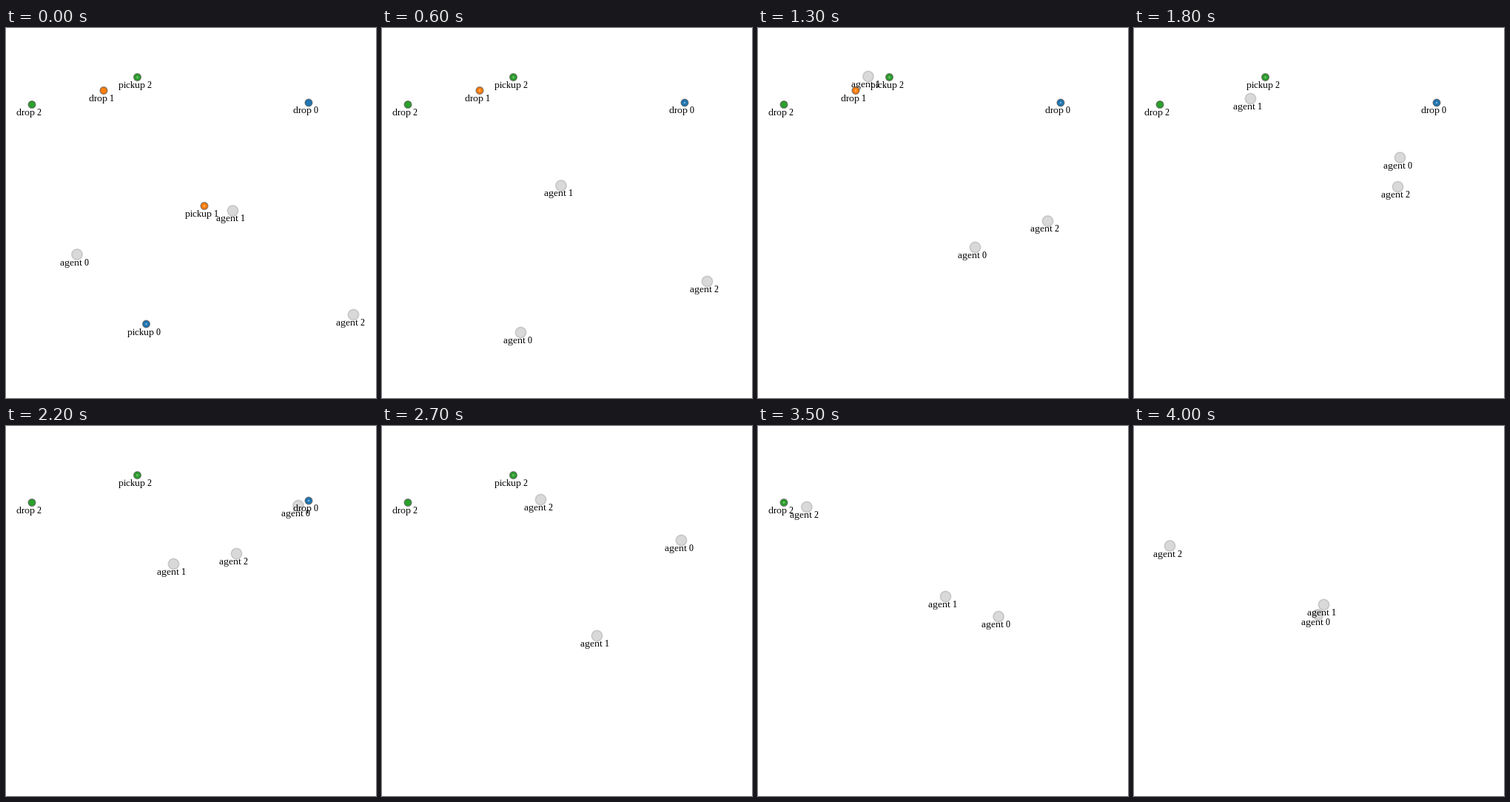
A matplotlib script for the animation above (4100 ms loop, 500x500 px).

```python
import numpy as np
import matplotlib.pyplot as plt
from matplotlib.animation import FuncAnimation
from matplotlib.patches import Circle

plt.rcParams.update({
    "font.family": "Liberation Serif",
    "text.hinting": "native",
    "text.hinting_factor": 1,
})

FRAMES, INTERVAL, DPI = 41, 100, 100
PX = 72 / DPI
BLUE, ORANGE, GREEN = "#1f77b4", "#ff7f0e", "#2ca02c"

# Way points (step, x, y) of each agent
PATHS = [
    [(0, 95.5, 305.5), (3, 138, 362), (6, 187, 411), (9, 233, 378),
     (13, 293, 296), (22, 394.5, 107), (24, 403, 98), (27, 404, 154),
     (31, 382, 236), (33, 356, 255), (36, 308.5, 256), (40, 248, 254.5)],
    [(0, 306, 246.5), (4, 271, 235), (6, 241.5, 212.5), (12, 154, 85),
     (13, 148.5, 65), (15, 128, 55), (16, 129, 62), (18, 157, 95),
     (22, 226, 186), (27, 290, 283), (28, 293.5, 285), (31, 279.5, 256),
     (35, 253, 230), (40, 256, 241)],
    [(0, 469, 387), (6, 439, 342), (13, 391, 260.5), (22, 311, 172),
     (27, 214, 99), (29, 181, 81), (31, 158.5, 86.5), (36, 46.5, 114),
     (37, 33, 118), (38, 30.5, 128), (40, 48, 161.5)],
]

# colour, pickup spot, drop spot, step of pickup, step of drop
TASKS = [
    (BLUE, (189, 399.5), (408.5, 100.5), 6, 23),
    (ORANGE, (267.5, 240), (131.5, 84), 4, 17),
    (GREEN, (177, 66), (34.5, 103), 29, 37),
]


def trace(path):
    """Cubic Hermite curve through the way points, starting at rest."""
    t, *xy = np.array(path, float).T
    steps = np.arange(FRAMES)
    i = np.clip(np.searchsorted(t, steps, "right") - 1, 0, len(t) - 2)
    h = t[i + 1] - t[i]
    u = (steps - t[i]) / h
    curve = []
    for p in xy:
        m = np.gradient(p, t)
        m[0] = 0
        curve.append((1 + 2 * u) * (1 - u) ** 2 * p[i]
                     + u * (1 - u) ** 2 * h * m[i]
                     + u * u * (3 - 2 * u) * p[i + 1]
                     + u * u * (u - 1) * h * m[i + 1])
    return np.column_stack(curve)


fig = plt.figure(figsize=(5, 5), dpi=DPI, facecolor="white")
ax = fig.add_axes([0, 0, 1, 1])
ax.set(xlim=(-0.5, 499.5), ylim=(499.5, -0.5))
ax.axis("off")


class Marker:
    def __init__(self, name, pos, radius, fill, edge, z):
        self.disc = ax.add_patch(Circle(pos, radius, fc=fill, ec=edge,
                                        lw=1.6 * PX, zorder=z))
        self.label = ax.text(0, 0, name, size=13 * PX, color="black",
                             ha="center", va="baseline", zorder=z + 0.5)
        self.parts = [self.disc, self.label]
        self.move(pos)

    def move(self, pos):
        self.disc.set_center(pos)
        self.label.set_position((pos[0] - 3.5, pos[1] + 14.5))

    def add_dot(self, pos, z):
        self.dot = ax.add_patch(Circle(pos, 1.1, fc=(1, 1, 1, 0.5), lw=0,
                                       zorder=z + 0.2))
        self.parts.append(self.dot)

    def show(self, on):
        for part in self.parts:
            part.set_visible(on)


def task_marker(name, pos, color, z):
    marker = Marker(name, pos, 4.8, color, (0.25, 0.25, 0.25, 0.5), z)
    marker.add_dot(pos, z)
    return marker


tracks = [trace(p) for p in PATHS]
agents = [Marker(f"agent {k}", track[0], 7.2, (0, 0, 0, 0.15),
                 (0, 0, 0, 0.14), 1 + k) for k, track in enumerate(tracks)]
pickups = [task_marker(f"pickup {k}", task[1], task[0], 5 + k)
           for k, task in enumerate(TASKS)]
drops = [task_marker(f"drop {k}", task[2], task[0], 9 + k)
         for k, task in enumerate(TASKS)]


def draw(step):
    for agent, track in zip(agents, tracks):
        agent.move(track[step])
    for pickup, drop, (*_, taken, done) in zip(pickups, drops, TASKS):
        pickup.show(step < taken)
        drop.show(step < done)
        # the dot marks the current goal
        drop.dot.set_visible(taken <= step < done)
    return []


anim = FuncAnimation(fig, draw, frames=FRAMES, interval=INTERVAL,
                     repeat=True, repeat_delay=0, blit=False)
plt.show()
```
